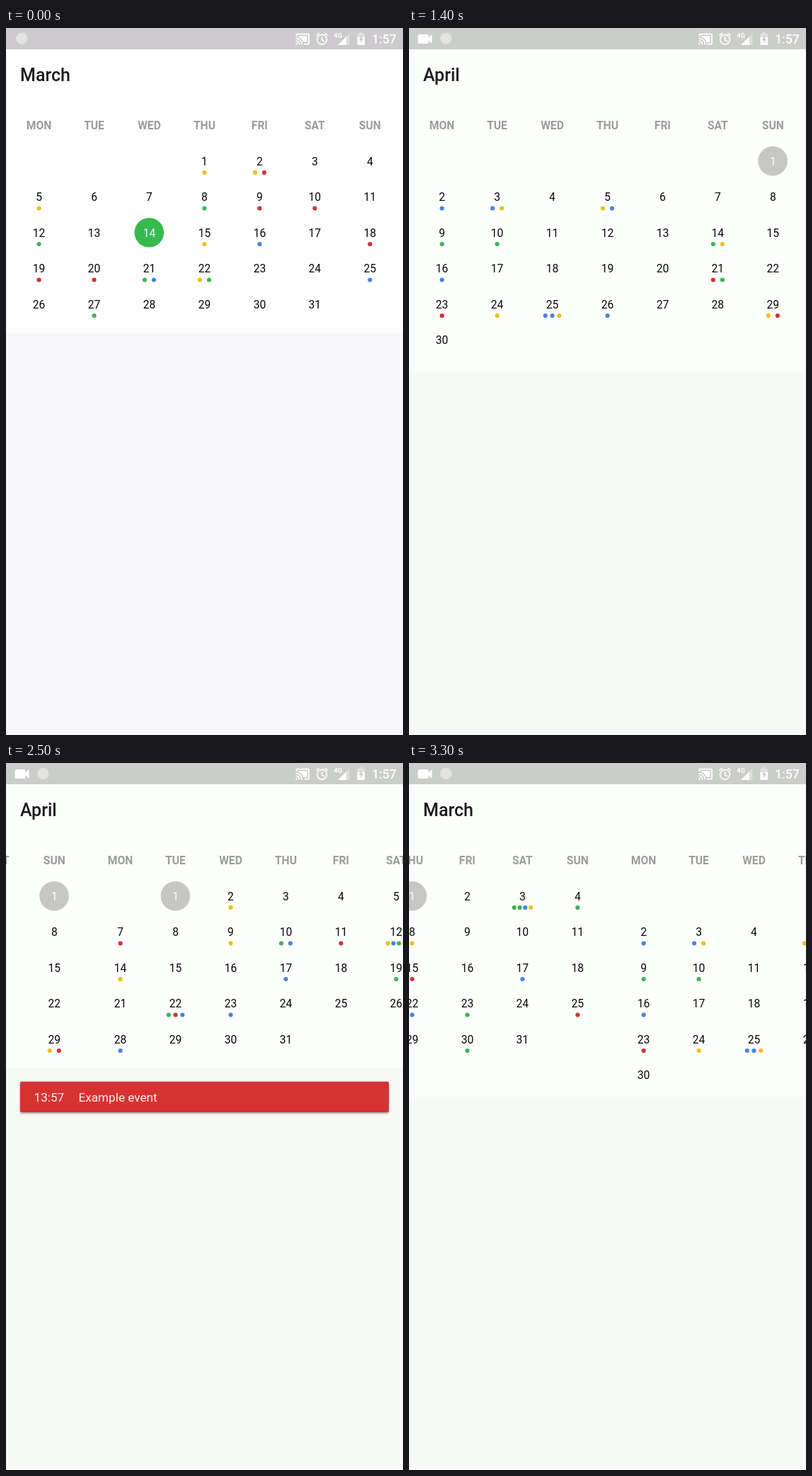
An HTML page for the animation above (3.4 s loop, 561 px wide and 998 px high).

```html
<!DOCTYPE html>
<html lang="en">
<head>
<meta charset="utf-8">
<title>Calendar swipe</title>
<style>
  html, body { margin: 0; width: 100%; height: 100%; overflow: hidden; }
  svg { display: block; width: 561px; height: 998px; font-family: Roboto, sans-serif; }
  .title { font-size: 25px; font-weight: 500; fill: #1b1c1b; }
  .weekday { font-size: 15.6px; font-weight: 700; fill: #9b9c9b; text-anchor: middle; }
  .day { font-size: 15.6px; fill: #080808; text-anchor: middle; }
  .picked { fill: #fff; }
  .event { font-size: 17.15px; fill: #fdf1f1; }
</style>
</head>
<body>
<svg viewBox="0 0 561 998">
  <defs>
    <clipPath id="clip"><rect id="clipBox" y="30" width="561" height="400"/></clipPath>
    <filter id="shadow" x="-5%" y="-30%" width="110%" height="170%">
      <feDropShadow dx="0" dy="1.6" stdDeviation="1.5" flood-opacity=".4"/>
    </filter>
  </defs>
  <rect id="back" width="561" height="998"/>
  <rect id="panel" y="30" width="561" height="400"/>
  <g id="pages" clip-path="url(#clip)"></g>
  <text id="title" class="title" x="20" y="74.5"></text>

  <g id="card">
    <rect x="20" y="449.7" width="521" height="43.4" rx="2" fill="#d73032" filter="url(#shadow)"/>
    <text class="event" x="39.5" y="478.2">13:57</text>
    <text class="event" x="102.5" y="478.2">Example event</text>
  </g>

  <rect id="bar" width="561" height="30"/>
  <g fill="#fff">
    <path id="camera" d="M14 9h12q1.500 0 1.500 1.500v3l5-4.500v13l-5-4.500v3q0 1.500-1.500 1.500h-12q-1.500 0-1.500-1.500v-9q0-1.500 1.500-1.500z"/>
    <circle id="badge" cy="15" r="8.200" fill="#e3e4e2" stroke="#d8d9d7" stroke-width="1"/>
    <path transform="translate(408.600 5) scale(.88)" d="M21 3H3c-1.100 0-2 .9-2 2v3h2V5h18v14h-7v2h7c1.100 0 2-.9 2-2V5c0-1.100-.9-2-2-2zM1 18v3h3c0-1.660-1.340-3-3-3zm0-4v2c2.760 0 5 2.240 5 5h2c0-3.870-3.130-7-7-7zm0-4v2c4.970 0 9 4.030 9 9h2c0-6.080-4.930-11-11-11zM19 7H5v1.630c3.960 1.280 7.090 4.410 8.370 8.370H19z"/>
    <g fill="none" stroke="#fff" stroke-width="1.700">
      <circle cx="446.500" cy="16.200" r="6.900"/>
      <path d="M446.500 12v4.800l3.500 2.100M438.500 10.500l4-3.300M454.500 10.500l-4-3.300"/>
    </g>
    <text x="463" y="14" font-size="9.500" font-weight="700">4G</text>
    <path d="M485.500 7.500v16.500h-16.500z" opacity=".35"/>
    <path d="M481 12v12h-12z"/>
    <path d="M499.500 6h4v2h3.500v16h-10.500v-16h3z" opacity=".4"/>
    <path d="M496.500 13h10.500v11h-10.500z"/>
    <path id="bolt" d="M502.500 10.500l-3.700 6.300h2.500v4.700l3.700-6.500h-2.500z"/>
    <text x="517" y="22" font-size="17.700" font-weight="500">1:57</text>
  </g>
</svg>
<script>
const WIDTH = 561, LOOP = 3400, STEP = 100;
const COLORS = { y: '#f0c00e', r: '#d63034', g: '#38b755', b: '#4783e5' };
const GREEN = '#37b950', GRAY = '#c6c7c5';
const WEEKDAYS = ['MON', 'TUE', 'WED', 'THU', 'FRI', 'SAT', 'SUN'];

const MONTHS = [
  { name: 'March', slot: 0, first: 3, days: 31, bottom: 430.3, picked: 14, ring: GREEN,
    marks: '1y 2yr 5y 8g 9r 10r 12g 15y 16b 18r 19r 20r 21gb 22yg 25b 27g' },
  { name: 'April', slot: 1, first: 6, days: 30, bottom: 484.8, picked: 1, ring: GRAY,
    marks: '2b 3by 5yb 9g 10g 14gy 16b 21rg 23r 24y 25bby 26b 29yr' },
  { name: 'May', slot: 2, first: 1, days: 31, bottom: 430.3, picked: 1, ring: GRAY,
    marks: '2y 7r 9y 10gb 11r 12ybgy 14y 17b 19g 22grb 23b 27r 28b' },
  // March again, reloaded after coming back
  { name: 'March', slot: 0, first: 3, days: 31, bottom: 430.3, picked: 1, ring: GRAY,
    marks: '3ggby 4g 8y 15r 17b 22b 23g 25r 30g' }
];

// Each swipe is dragged, then let go at `release` and settles on its own.
const SWIPES = [
  { start: 700, release: 900, from: 0, to: 1 },
  { start: 1500, release: 1500, from: 1, to: 2 },
  { start: 2400, release: 2500, from: 2, to: 1 },
  { start: 3100, release: 3200, from: 1, to: 0 }
];
const TRAVEL = [10, 45, 115, 285, 480, 551, 560, 561];

const $ = id => document.getElementById(id);
const clamp = (v, lo = 0, hi = 1) => Math.min(hi, Math.max(lo, v));
const mix = (a, b, k) => a + (b - a) * k;
const columnX = i => 46.6 + 77.95 * i;
const rowY = i => 188 + 50.5 * i;

function dots(x, y, keys) {
  const gap = 39 / (keys.length + 1);
  return [...keys].map((key, i) =>
    `<circle cx="${x + (i - (keys.length - 1) / 2) * gap}" cy="${y + 16}" r="3.1" fill="${COLORS[key]}"/>`
  ).join('');
}

function monthMarkup(month) {
  const marks = {};
  for (const [, day, keys] of month.marks.matchAll(/(\d+)([a-z]+)/g)) marks[day] = keys;
  let out = WEEKDAYS.map((name, i) =>
    `<text class="weekday" x="${columnX(i)}" y="143.1">${name}</text>`).join('');
  for (let day = 1; day <= month.days; day++) {
    const cell = month.first + day - 1;
    const x = columnX(cell % 7), y = rowY(Math.floor(cell / 7));
    const picked = day === month.picked;
    if (picked) out += `<circle cx="${x - .2}" cy="${y - .2}" r="20.8" fill="${month.ring}"/>`;
    out += `<text class="day${picked ? ' picked' : ''}" x="${x}" y="${y + 5.6}">${day}</text>`;
    out += dots(x, y, marks[day] || '');
  }
  return `<g>${out}</g>`;
}

$('pages').innerHTML = MONTHS.map(monthMarkup).join('');
const pages = [...$('pages').children];

function pagerState(t) {
  const state = { scroll: 0, month: 0, bottom: MONTHS[0].bottom };
  for (const { start, release, from, to } of SWIPES) {
    if (t < start) break;
    const k = (t - release) / STEP;
    const travelled = TRAVEL[clamp(k + 2, 0, TRAVEL.length - 1)];
    state.scroll = mix(from, to, travelled / WIDTH);
    if (k >= 0) state.month = to;
    const ease = (1 - Math.cos(Math.PI * clamp(k / 3))) / 2;
    state.bottom = mix(MONTHS[from].bottom, MONTHS[to].bottom, ease);
  }
  return state;
}

function cardOpacity(t) {
  return Math.min(clamp((t - 1900) / 200), clamp((3050 - t) / 150));
}

function render(t) {
  const { scroll, month, bottom } = pagerState(t);
  const reloaded = t >= 2000;
  pages.forEach((page, i) => {
    const { slot } = MONTHS[i];
    const current = slot > 0 || reloaded === (i === 3);
    page.style.display = current && Math.abs(slot - scroll) < 1 ? '' : 'none';
    page.setAttribute('transform', `translate(${(slot - scroll) * WIDTH} 0)`);
  });
  $('title').textContent = MONTHS[month].name;
  for (const id of ['panel', 'clipBox']) $(id).setAttribute('height', bottom - 30);
  $('card').setAttribute('transform', `translate(0 ${bottom - MONTHS[0].bottom})`);
  $('card').setAttribute('opacity', cardOpacity(t));

  const recording = t >= 100;
  $('camera').style.display = recording ? '' : 'none';
  $('badge').setAttribute('cx', recording ? 52.3 : 22.3);
  $('back').setAttribute('fill', recording ? '#f7f9f7' : '#f8f7fa');
  $('panel').setAttribute('fill', recording ? '#fdfffc' : '#fefefe');
  for (const id of ['bar', 'bolt']) $(id).setAttribute('fill', recording ? '#cbcdca' : '#cccacc');
}

// The screen refreshes ten times a second.
function tick() {
  const t = performance.now() % LOOP;
  render(Math.floor(t / STEP) * STEP);
  requestAnimationFrame(tick);
}
tick();
</script>
</body>
</html>
```
